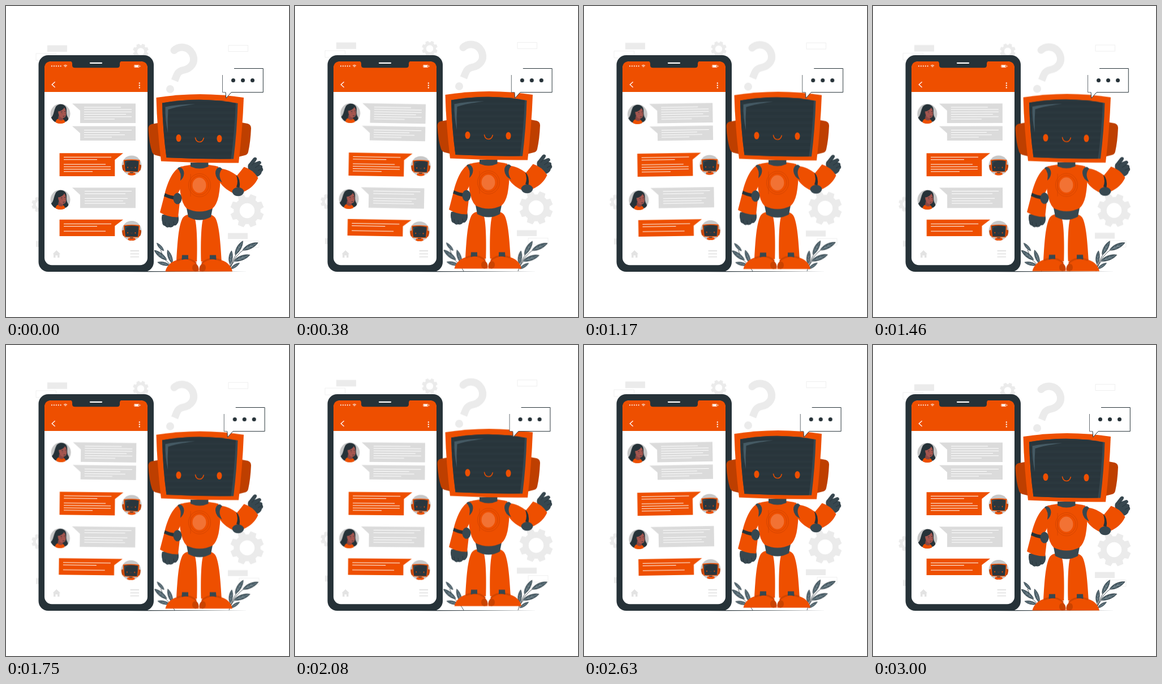
An HTML page without scripts for the animation above (3.04 s loop, 500x550 px).

```html
<!DOCTYPE html>
<html lang="en">
<head>
<meta charset="utf-8">
<title>Chat robot</title>
<style>
html, body { margin: 0; width: 100%; height: 100%; overflow: hidden; background: #fff; }
svg { display: block; width: 500px; height: 550px; }
.o { fill: #ee4f00; }
.od { fill: #be3f00; }
.d { fill: #263238; }
.j { fill: #37474f; }
.g { fill: #ebebeb; }
.n { fill: none; }
.float, .wind, .shake { animation: 3040ms linear infinite; }
.float { animation-name: float; }
.wind { animation-name: wind; }
.shake { animation-name: shake; }
/* two 1.5 s cycles, then a 40 ms rest */
@keyframes float {
  0%, 49.342%, 98.684%, 100% { transform: translateY(0); }
  24.671%, 74.013% { transform: translateY(-10px); }
}
@keyframes wind {
  0%, 49.342%, 98.684%, 100% { transform: rotate(0deg); }
  12.336%, 61.678% { transform: rotate(1deg); }
  37.007%, 86.349% { transform: rotate(-1deg); }
}
/* one 3 s cycle, then the same rest */
@keyframes shake {
  0%, 98.684%, 100% { transform: translateX(0); }
  9.868%, 88.816% { transform: translateX(-1px); }
  19.737%, 78.947% { transform: translateX(2px); }
  29.605%, 49.342%, 69.079% { transform: translateX(-4px); }
  39.474%, 59.211% { transform: translateX(4px); }
}
.chat { transform-origin: 158px 293px; }
.left { transform-origin: 298px 469px; }
.right { transform-origin: 395px 469px; }
</style>
</head>
<body>
<svg viewBox="0 0 500 550">
<defs>
  <pattern id="scan" width="4" height="2.2" patternUnits="userSpaceOnUse">
    <rect class="d" width="4" height="2.2"/>
    <rect class="j" width="4" height=".45"/>
  </pattern>
  <clipPath id="round"><circle r="17.5"/></clipPath>

  <g id="gear">
    <circle r="18.5" class="n" stroke="#ebebeb" stroke-width="10.500"/>
    <g id="teeth2">
      <g id="teeth1">
        <path id="tooth" class="g" d="M-7-21L-5.500-29.500H5.500L7-21Z" transform="rotate(22.5)"/>
        <use href="#tooth" transform="rotate(45)"/>
      </g>
      <use href="#teeth1" transform="rotate(90)"/>
    </g>
    <use href="#teeth2" transform="rotate(180)"/>
  </g>

  <g id="leaf">
    <path d="M0 0C6-5 20-6 29 0C20 5 7 4.500 0 0Z" fill="#455a64" stroke="#263238" stroke-width=".6"/>
    <path d="M0 0L26 0M7 0L12-2.500M13 0L18-2.500M8 0L13 2.200M14 0L19 2.200" class="n" stroke="#a6b2b7" stroke-width=".5"/>
  </g>

  <g id="head">
    <path class="od" d="M268 207L257 209Q251 211 251.500 218Q253 243 258 258Q260 263 265 264L277 267ZM416 206L427 208Q433 210 433 216Q432 240 428 258Q427 263 422 264L410 267Z"/>
    <path class="o" d="M265.500 162Q343 150 420 162Q418 218 411 277.500Q342 278 274 274.500Q267 218 265.500 162Z"/>
    <path class="j" d="M276 171.500Q343 160 409.500 172Q408 222 402 270.500Q342 271 283.500 268Q277 220 276 171.500Z"/>
    <path fill="url(#scan)" d="M276 171.500Q343 160 406 172Q404 222 397.500 270.300Q342 271 283.500 268Q277 220 276 171.500Z"/>
    <path fill="#455a64" d="M281.500 178.500Q306 173.500 334 173.500Q305 177 286.500 183Q285 203 286 224Q281 202 281.500 178.500Z"/>
    <ellipse class="o" cx="305" cy="233.500" rx="4.500" ry="6.600"/>
    <ellipse class="o" cx="377" cy="234.500" rx="4.500" ry="6.600"/>
    <path class="n" stroke="#ee4f00" stroke-width="1.500" stroke-linecap="round" d="M334.500 233C336.500 243 347 243 349.300 233.500"/>
  </g>

  <g id="torso">
    <path class="j" d="M318 352L366 352L362 373Q342 384 322 373Z"/>
    <path class="o" d="M310 284Q342 276 375 284Q382 300 375.500 337Q372 352 365 358Q342 369 319 358Q311 350 308 330Q304 300 310 284Z"/>
    <path class="j" d="M326 277H357.500V284Q342 291 326 284Z"/>
    <g class="n" stroke="#d14500" stroke-width=".8">
      <ellipse cx="342" cy="317" rx="19.500" ry="20.500"/>
      <ellipse cx="342" cy="317" rx="16" ry="17"/>
      <path d="M326 297V337"/>
    </g>
    <ellipse cx="341.500" cy="317" rx="12" ry="13.500" fill="#f27234"/>
  </g>

  <g id="person">
    <circle r="17.500" fill="#c7c7c7"/>
    <g clip-path="url(#round)">
      <path class="d" d="M-9-10C-7-18 5-19 9-13C13-8 9 0 13 6C16 11 13 15 9 14L-8 14C-13 16-18 12-17 7C-12 5-12-4-9-10Z"/>
      <path class="o" d="M-9 20Q-9 9-3 9L5 10Q9 12 9 20Z"/>
      <path fill="#8d4742" d="M-3 3H5L5 10.500Q1 14-4 9.500Z"/>
      <path fill="#a5564f" d="M-4-4Q4-5 7-11Q11-5 10 2Q9 8 3 7.500Q-3 6-4-4Z"/>
      <path class="n" stroke="#263238" stroke-width=".9" d="M1-3L3.500-3.500M7-4L9-4M2.500-.5H3.300M8-1H8.800M4.500 4.500Q6 5 7.500 4"/>
    </g>
  </g>

  <g id="bot">
    <circle r="17.500" fill="#c7c7c7"/>
    <g clip-path="url(#round)">
      <g transform="translate(0 .5) scale(.186) translate(-342 -217)">
        <use href="#torso"/><use href="#head"/>
      </g>
    </g>
  </g>
</defs>

<rect width="500" height="550" fill="#fff"/>

<g class="float">
  <path class="g" d="M73 69.500H108V81H73ZM392 401.500H427V412H392ZM53 415.500H88V426H53Z"/>
  <path class="n" stroke="#ebebeb" stroke-width=".8" d="M393 69.500H427.500V80.500H393ZM53 84H88.500V96H53ZM412 415.500H447V427H412Z"/>
  <use href="#gear" transform="translate(426 362)"/>
  <use href="#gear" transform="translate(238 80.500) scale(.47)"/>
  <use href="#gear" transform="translate(59 351) scale(.47)"/>
  <path class="n" stroke="#ebebeb" stroke-width="13" d="M297 78.500C306 70 322 71 329 84C337 101 325 111 313 113.500C303 115.500 302 122 298 132"/>
  <circle class="g" cx="297" cy="78.500" r="6.500"/>
  <circle class="g" cx="290" cy="147" r="7"/>
</g>

<path class="d" d="M68 469.500L245 469L428 469.500L245 470.200Z"/>

<g class="wind left">
  <path class="n" stroke="#263238" stroke-width=".8" d="M298 469Q291 456 279 447T262 433M293 461Q283 457 274 454M294 462L290 447M279 447L273 431"/>
  <use href="#leaf" transform="translate(284 449) rotate(218) scale(.95)"/>
  <use href="#leaf" transform="translate(279 433) rotate(228) scale(.65)"/>
  <use href="#leaf" transform="translate(294 455) rotate(250) scale(.86)"/>
  <use href="#leaf" transform="translate(289 458) rotate(193) scale(.75)"/>
</g>
<g class="wind right">
  <path class="n" stroke="#263238" stroke-width=".8" d="M394 469Q400 449 408 437M397 461Q406 440 420 431M397 461Q401 452 407 450M396 463L396 453"/>
  <use href="#leaf" transform="translate(396 457) rotate(-84) scale(.84)"/>
  <use href="#leaf" transform="translate(405 440) rotate(-61) scale(.96)"/>
  <use href="#leaf" transform="translate(418 432) rotate(-26) scale(1.040)"/>
  <use href="#leaf" transform="translate(403 451) rotate(-21) scale(1.030)"/>
  <use href="#leaf" transform="translate(397 465) rotate(-34) scale(.65)"/>
</g>

<g>
  <rect class="d" x="57.500" y="87" width="203.500" height="383" rx="17"/>
  <rect x="68" y="98" width="182" height="360.200" rx="13" fill="#fff"/>
  <path class="o" d="M68 152V110Q68 98 80 98H238Q250 98 250 110V152Z"/>
  <path class="d" d="M114 97.500H204Q201 98.500 201 102V105Q201 109.200 196 109.200H122Q117 109.200 117 105V102Q117 98.500 114 97.500Z"/>
  <g class="n" stroke="#fff" stroke-linecap="round">
    <path stroke-width="2.300" d="M149 100.800H169"/>
    <path stroke-width="2.100" stroke-dasharray="0 3.900" d="M81 106.300H97"/>
    <path stroke-width="1" d="M102.300 105.300Q105 103.300 107.700 105.300M103.700 106.700Q105 105.700 106.300 106.700M105 108V108.100"/>
    <rect x="226.500" y="104.500" width="9" height="4" rx="1" stroke-width=".7"/>
    <path stroke-width="2.800" stroke-linecap="butt" d="M227.500 106.500H234"/>
    <path stroke-width="1" d="M237 106V107"/>
    <path stroke-width="1.300" d="M86.200 134.500L81.200 139L86.200 143.500"/>
    <path stroke-width="2.300" stroke-dasharray="0 4" d="M235.800 136.500V144.600"/>
  </g>
  <path fill="#e3e3e3" d="M82.500 438.500L89.200 432L96 438.500H94.500V445H91V441H87.500V445H84V438.500Z"/>
  <path class="n" stroke="#e3e3e3" stroke-width="1.800" d="M219.500 433H235M219.500 438.300H235M219.500 443.600H235"/>
</g>

<g class="wind chat">
  <path fill="#dbdbdb" d="M117 172.500H229V207H131V185ZM117 212.500H229V238H131V225ZM117 321.200H229V357.300H131V334Z"/>
  <path class="o" d="M94.600 260.200H207L192.300 272V301H94.600ZM94.600 377.800H207L192.300 389V407H94.600Z"/>
  <path class="n" stroke="#fff" stroke-width="1" d="M138 179H203M138 183H222M138 187.300H222M138 191.500H212M138 195.800H222M138 200H192M138 219.500H222M138 223.500H201M138 227.800H210M138 232H187M139 327.500H222M139 332H211M139 340.300H215M139 344.700H207M139 349H211M102 267.300H186M102 271.700H161M102 280H176M102 284.300H185M102 288.600H185M102 292.800H153M102 385.300H186M102 389.600H161M102 398.200H176"/>
  <use href="#person" x="96" y="190.500"/>
  <use href="#person" x="96" y="342.500"/>
  <use href="#bot" x="222" y="282"/>
  <use href="#bot" x="222" y="397.500"/>
</g>

<g class="float">
  <!-- legs -->
  <path class="o" d="M301 452C303 415 305 391 311 377Q315 369 323 369Q331 369 334 377C338 392 338 430 337.300 452ZM344.700 452C344 430 344 392 348 377Q351 369 359 369Q367 369 371 377C377 391 379 420 381 452Z"/>
  <path class="o" d="M281.500 469.500C284 458 294 451 303 449C318 445 334 448 337 457Q341 462 340.500 469.500ZM400 469.500C398 458 388 451 379 449C364 445 348 448 345 457Q341 462 341.500 469.500Z"/>
  <path class="n" stroke="#d14500" stroke-width="3" d="M302 450Q323 442 336 455M380 450Q359 442 346 455"/>
  <path class="j" d="M311 440.500H322V448Q316 447 310.500 449ZM360 440.500H371L371.500 449Q366 447 360 448Z"/>
  <path class="od" opacity=".75" d="M329 463Q329 456 336 456Q341 460 340.500 466Q338 470 334 469.500Q329 468 329 463ZM353 463Q353 456 346 456Q341 460 341.500 466Q344 470 348 469.500Q353 468 353 463Z"/>
  <use href="#torso"/>
  <!-- resting arm -->
  <path class="j" d="M276 369H304Q307 381 302 386Q300 389 297 388Q293 393 288 391Q284 393 281 389Q276 388 276 382Q274 375 276 369Z"/>
  <path class="n" stroke="#263238" stroke-width=".7" d="M282 389L281 382M289 391L288 384M297 388L296 381"/>
  <path class="o" d="M311 283.500C297 287 286 308 280 334L272 365Q286 374 304 373.500L307 347L300 338C306 328 313 315 314 300Z"/>
  <path class="d" d="M281 331Q290 336 301 336L299 343Q288 341 279 336.500Z"/>
  <ellipse class="j" cx="303" cy="340.500" rx="7.500" ry="10"/>
  <path class="j" d="M306 285Q314 286 314.500 296Q314 304 308 309Q311 295 303 287Z"/>
  <!-- waving arm -->
  <path class="o" d="M374 288C386 286 399 293 408 300L414 320L402 331C390 326 380 317 376 308Z"/>
  <path class="j" d="M378 285Q370 286 370 296Q371 307 382 312Q373 298 382 288Z"/>
  <path class="j" d="M428 288Q426 281 430 278L437 269Q440 266 443 269Q444 272 439 277L447 274Q451 274 451 278L448 281Q454 281 453 286Q456 290 452 293Q451 299 444 302Z"/>
  <path class="n" stroke="#263238" stroke-width=".8" d="M439 277L434 282M448 281L440 286M453 287L445 291"/>
  <path class="o" d="M420.500 284.500Q436 289 445.500 304Q438 321 419 329L405 321Q411 310 407.500 300.500Q414 293 420.500 284.500Z"/>
  <path class="d" d="M406.500 298.500Q415 306 412.500 322L407 320Q411 310 406.500 298.500Z"/>
  <ellipse class="j" cx="410" cy="328.500" rx="10.300" ry="7.800"/>
  <use href="#head"/>
</g>

<g class="shake">
  <path fill="#fff" d="M382.500 110.500H454.300V152.700H398L388.800 163L388 152.700H382.500Z"/>
  <path class="n" stroke="#263238" d="M403 110.500H454.300V152.700H398L388.800 163L388 152.700"/>
  <path class="n" stroke="#263238" stroke-width=".7" d="M388 152.700H382.500V122"/>
  <g class="d">
    <circle cx="401.500" cy="131.500" r="3.500"/>
    <circle cx="418.500" cy="131.500" r="3.500"/>
    <circle cx="435.500" cy="131.500" r="3.500"/>
  </g>
</g>
</svg>
</body>
</html>
```
